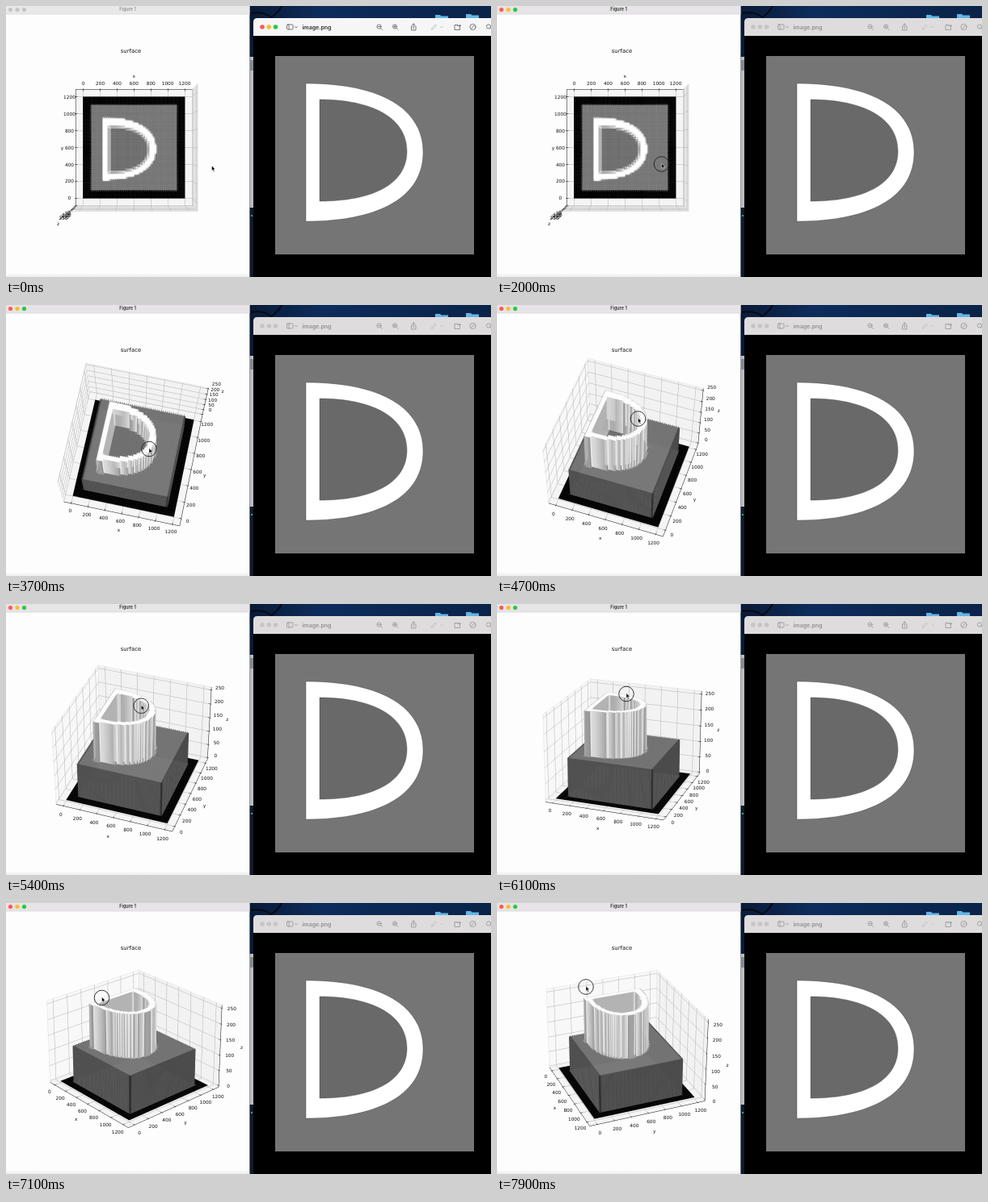
Recreate the animation shown at these times as an HTML page with a canvas. Size 600 by 336 pixels, loop 8000 ms.

```html
<!DOCTYPE html>
<html lang="en">
<head>
<meta charset="utf-8">
<title>Surface of an image</title>
<style>
html, body { margin: 0; width: 600px; height: 336px; overflow: hidden; background: #0c2142; }
#stage { position: relative; width: 600px; height: 336px; overflow: hidden; }
canvas, svg { position: absolute; left: 0; top: 0; display: block; }
.plot { font-family: "DejaVu Sans", sans-serif; text-anchor: middle; fill: #111; }
.ui { font-family: Inter, "Open Sans", sans-serif; font-weight: 600; }
.icon { fill: none; stroke-width: .8; stroke-linecap: round; stroke-linejoin: round; }
</style>
</head>
<body>
<div id="stage">
<canvas id="plot" width="604" height="672" style="width:302px;height:336px"></canvas>
<svg width="600" height="336" viewBox="0 0 600 336">
  <defs>
    <linearGradient id="sky" x2="1" y2="0">
      <stop offset="0" stop-color="#0a1a36"/><stop offset=".3" stop-color="#0d2c5c"/><stop offset="1" stop-color="#0a2348"/>
    </linearGradient>
    <linearGradient id="foot" x2="0" y2="1">
      <stop offset="0" stop-color="#fdfdfd"/><stop offset="1" stop-color="#ececec"/>
    </linearGradient>
  </defs>

  <rect x="301" width="299" height="336" fill="url(#sky)"/>
  <path d="M303 9Q320 6 329 15M341 0Q337 8 327 15" fill="none" stroke="#050a16" stroke-width="2"/>
  <g fill="#62b5e4">
    <path d="M531 11h6l1.500 1.500h8.500v6h-16zM569 10h6l1.500 1.500h8.500v6h-16z"/>
  </g>
  <rect x="301.500" y="63" width="5" height="187" fill="#b9bbc0"/>
  <rect x="301.500" y="67" width="5" height="13" fill="#85898f"/>
  <rect x="301.500" y="250" width="5" height="86" fill="#101a2b"/>
  <rect x="303" y="259" width="2" height="2" fill="#4a9a6a"/>

  <path id="bar2" d="M306 37V20q0-5 5-5H600V37z"/>
  <rect x="306" y="37" width="294" height="299" fill="#000"/>
  <rect x="333" y="62" width="246" height="246" fill="#757575"/>
  <path id="hole" fill="#696969"/>
  <path id="letter" fill="#fff" fill-rule="evenodd" stroke="#444" stroke-width=".4"/>
  <g id="lights2"></g>
  <g id="tools" class="icon">
    <rect x="347.500" y="23" width="7.500" height="6" rx="1"/><path d="M350 23v6M357.500 25.500l1.500 1.500 1.500-1.500"/>
    <circle cx="461.500" cy="25.500" r="2.600"/><path d="M463.500 27.500l2 2M460.300 25.500h2.400"/>
    <circle cx="481" cy="25.500" r="2.600"/><path d="M483 27.500l2 2M479.800 25.500h2.400M481 24.300v2.400"/>
    <path d="M502.500 25h-1v5h5.500v-5h-1M504.200 28v-6M502.600 23.500l1.600-1.600 1.600 1.600"/>
    <g opacity=".4"><path d="M526.500 29l.6-2 4-4 1.400 1.400-4 4zM537.500 25.500l1.500 1.500 1.500-1.500"/></g>
    <path d="M559 23.500h-4v6h6.500v-3M558.500 24.500h4M561 23l1.500 1.500-1.500 1.500"/>
    <circle cx="577.500" cy="26" r="3.600"/><path d="M575.800 28l3.200-3.800"/>
    <circle cx="597" cy="25.500" r="2.600"/><path d="M599 27.500l2 2"/>
  </g>
  <text id="name2" class="ui" x="366.500" y="28.600" font-size="7">image.png</text>

  <rect y="331" width="301" height="5" fill="url(#foot)"/>
  <rect id="bar1" width="301.500" height="10"/>
  <path d="M0 10.200H301.500M301.500 0V336" stroke="#c9c9c9" stroke-width=".5"/>
  <g id="lights1"></g>
  <text id="name1" class="ui" x="150.500" y="6.400" font-size="5.500" text-anchor="middle">Figure 1</text>
  <text class="plot" x="154.500" y="58.200" font-size="6.900">surface</text>
  <g id="labels" class="plot" font-size="5.800"></g>
  <g id="cursor">
    <circle id="ring" r="9.300" cy="1" fill="none" stroke="#222" stroke-width=".9"/>
    <path d="M0 0V6.300L1.400 5 2.500 7.400 3.500 6.900 2.400 4.600H4.400z" fill="#000" stroke="#fff" stroke-width=".5"/>
  </g>
</svg>
</div>
<script>
const LOOP = 8000, STEP = 100;
const $ = id => document.getElementById(id);
const ctx = $('plot').getContext('2d');

// The letter, in stage coordinates of the image window
const OUTER = 'M371 96C465 96 516 128 516 181.500S465 267 371 267Z';
const INNER = 'M388 116C452 116 496 138 496 180S452 242 388 242Z';
$('letter').setAttribute('d', OUTER + INNER);
$('hole').setAttribute('d', INNER);

// Keys: time, then values
const POSE = [[0, 90, -90], [2700, 90, -90], [3700, 75, -78], [4700, 53, -71],
  [6100, 21, -70], [7100, 26, -41.5], [7900, 28.5, -22]];
const MOUSE = [[0, 254.5, 198], [100, 254, 199], [400, 226, 213], [600, 207, 206], [900, 207, 206],
  [1700, 203.500, 195], [2700, 203.500, 195], [3700, 177, 177.500], [4700, 174.500, 140],
  [6100, 160, 110.500], [7100, 118.500, 116.500], [7900, 110, 103]];

function at(keys, t) {
  let i = 1;
  while (i < keys.length - 1 && keys[i][0] < t) i++;
  const a = keys[i - 1], b = keys[i];
  const p = Math.min(1, (t - a[0]) / (b[0] - a[0]));
  return a.slice(1).map((v, j) => v + (b[j + 1] - v) * p);
}

// Height field
const SIZE = 1199, STRIDE = 24, SUB = 12, GRAY = 118;
const outer = new Path2D(OUTER), inner = new Path2D(INNER);
function height(x, y) {
  if (x < 100 || x >= 1100 || y < 100 || y >= 1100) return 0;
  const px = 333 + (x - 100) * .246, py = 62 + (y - 100) * .246;
  if (!ctx.isPointInPath(outer, px, py)) return GRAY;
  return ctx.isPointInPath(inner, px, py) ? GRAY - 8 : 255;
}

function makeCell(x, y) {
  const w = Math.min(STRIDE, SIZE - x), h = Math.min(STRIDE, SIZE - y);
  const ring = [];
  const add = (u, v) => ring.push([x + u * w, y + v * h, height(x + u * w, y + v * h)]);
  for (let side = 0; side < 4; side++)
    for (let i = 0; i < SUB; i++) {
      const p = i / SUB;
      if (side === 0) add(p, 0);
      else if (side === 1) add(1, p);
      else if (side === 2) add(1 - p, 1);
      else add(0, 1 - p);
    }
  const mean = ring.reduce((s, q) => s + q[2], 0) / ring.length;
  const flat = ring.every(q => q[2] === ring[0][2]);
  const g = Math.round(mean);
  return { pts: flat ? ring.filter((q, i) => i % SUB === 0) : ring, color: `rgb(${g},${g},${g})`, depth: 0 };
}
const cells = [];
for (let y = 0; y < SIZE; y += STRIDE)
  for (let x = 0; x < SIZE; x += STRIDE) cells.push(makeCell(x, y));

// Camera
const SPAN = [1374, 1374, 265.6], MID = [599.5, 599.5, 127.5], BOX = [1.1904, 1.1904, .8928];
const CX = 158.3, CY = 175.5, FOCAL = 1265, DIST = 10;
let ca, sa, ce, se;
function aim(elev, azim) {
  const r = Math.PI / 180;
  ca = Math.cos(azim * r); sa = Math.sin(azim * r);
  ce = Math.cos(elev * r); se = Math.sin(elev * r);
}
function project(p) {
  const [x, y, z] = p.map((v, i) => (v - MID[i]) * BOX[i] / SPAN[i]);
  const out = ca * x + sa * y;
  const near = ce * out + se * z;
  const k = FOCAL / (DIST - near);
  return [CX + k * (ca * y - sa * x), CY - k * (ce * z - se * out), near];
}
const edge = (axis, sign) => MID[axis] + sign * SPAN[axis] / 2;

function trace(pts) {
  ctx.beginPath();
  for (const p of pts) ctx.lineTo(p[0], p[1]);
}
function line(color, width, ...pts) {
  trace(pts.map(project));
  ctx.strokeStyle = color;
  ctx.lineWidth = width;
  ctx.stroke();
}

// Tick labels
const TICKS = [200, 200, 50].map((step, i) => Array.from({ length: i < 2 ? 7 : 6 }, (_, n) => n * step));
const svgText = s => {
  const e = document.createElementNS('http://www.w3.org/2000/svg', 'text');
  e.textContent = s;
  $('labels').append(e);
  return e;
};
const tickText = TICKS.map(list => list.map(svgText));
const axisText = ['x', 'y', 'z'].map(svgText);
function place(e, p) {
  const [x, y] = project(p);
  e.setAttribute('x', x.toFixed(2));
  e.setAttribute('y', (y + 2.2).toFixed(2));
}

function drawBox(top) {
  const s = top ? -1 : 1;
  const back = [edge(0, -s), edge(1, s), edge(2, -1)];
  const front = [edge(0, s), edge(1, -s), edge(2, 1)];
  // Signs of the edge that carries each axis
  const side = [[0, -s, -1], [s, 0, -1], [s, s, 0]];
  const shades = ['#f8f8f8', '#f2f2f2', '#f5f5f5'];
  for (let a = 0; a < 3; a++) {
    const b = (a + 1) % 3, c = (a + 2) % 3;
    const corner = (u, v) => { const p = []; p[a] = back[a]; p[b] = u; p[c] = v; return p; };
    trace([corner(back[b], back[c]), corner(front[b], back[c]),
      corner(front[b], front[c]), corner(back[b], front[c])].map(project));
    ctx.closePath();
    ctx.fillStyle = shades[a];
    ctx.fill();
    ctx.strokeStyle = '#e2e2e2';
    ctx.lineWidth = .5;
    ctx.stroke();
  }
  for (let a = 0; a < 3; a++) {
    const b = (a + 1) % 3, c = (a + 2) % 3;
    for (const t of TICKS[a]) {
      const point = (u, v) => { const p = []; p[a] = t; p[b] = u; p[c] = v; return p; };
      line('#b4b4b4', .5, point(front[b], back[c]), point(back[b], back[c]), point(back[b], front[c]));
    }
  }
  for (let a = 0; a < 3; a++) {
    const spot = (v, off) => MID.map((m, i) => i === a ? v : m + side[a][i] * SPAN[i] * (.5 + off));
    line('#111', .5, spot(edge(a, -1), 0), spot(edge(a, 1), 0));
    const dir = a === 0 ? 1 : 0;
    TICKS[a].forEach((t, i) => {
      const p = spot(t, 0), q = spot(t, 0);
      p[dir] += side[a][dir] * 11;
      q[dir] -= side[a][dir] * 23;
      line('#111', .5, p, q);
      place(tickText[a][i], spot(t, .0565));
    });
    place(axisText[a], spot(MID[a], .123));
  }
}

function drawSurface() {
  for (const c of cells) {
    c.shape = c.pts.map(project);
    c.depth = c.shape.reduce((s, p) => s + p[2], 0) / c.shape.length;
  }
  cells.sort((a, b) => a.depth - b.depth);
  ctx.lineWidth = .22;
  ctx.lineJoin = 'bevel';
  for (const c of cells) {
    trace(c.shape);
    ctx.closePath();
    ctx.fillStyle = ctx.strokeStyle = c.color;
    ctx.fill();
    ctx.stroke();
  }
}

function lights(id, xs, y, r, on) {
  const colors = on ? ['#fc5b57', '#fdbc2e', '#28c840'] : ['#c6c4c5', '#c6c4c5', '#c6c4c5'];
  $(id).innerHTML = xs.map((x, i) => `<circle cx="${x}" cy="${y}" r="${r}" fill="${colors[i]}"/>`).join('');
}

function drawWindows(figureActive) {
  const ink = on => on ? '#303030' : '#929092';
  lights('lights1', [5.5, 14, 22.5], 4.600, 2.600, figureActive);
  lights('lights2', [317, 325.3, 333.5], 26, 2.800, !figureActive);
  $('bar1').setAttribute('fill', figureActive ? '#e6e4e6' : '#e9e8e9');
  $('bar2').setAttribute('fill', figureActive ? '#dfdcdd' : '#f7f6f7');
  $('name1').setAttribute('fill', ink(figureActive));
  $('name2').setAttribute('fill', ink(!figureActive));
  $('tools').setAttribute('stroke', figureActive ? '#949294' : '#5c5c5c');
}

function render(t) {
  const [elev, azim] = at(POSE, t), [mx, my] = at(MOUSE, t);
  aim(elev, azim);
  ctx.setTransform(2, 0, 0, 2, 0, 0);
  ctx.fillStyle = '#fdfdfd';
  ctx.fillRect(0, 0, 302, 336);
  drawBox(elev > 89.9);
  drawSurface();
  drawWindows(t >= 900);
  $('cursor').setAttribute('transform', `translate(${mx} ${my})`);
  $('ring').setAttribute('visibility', t >= 1800 ? 'visible' : 'hidden');
}

const start = performance.now();
let shown = -1;
function tick() {
  const t = Math.floor((performance.now() - start) % LOOP / STEP) * STEP;
  if (t !== shown) render(shown = t);
  requestAnimationFrame(tick);
}
tick();
</script>
</body>
</html>
```
